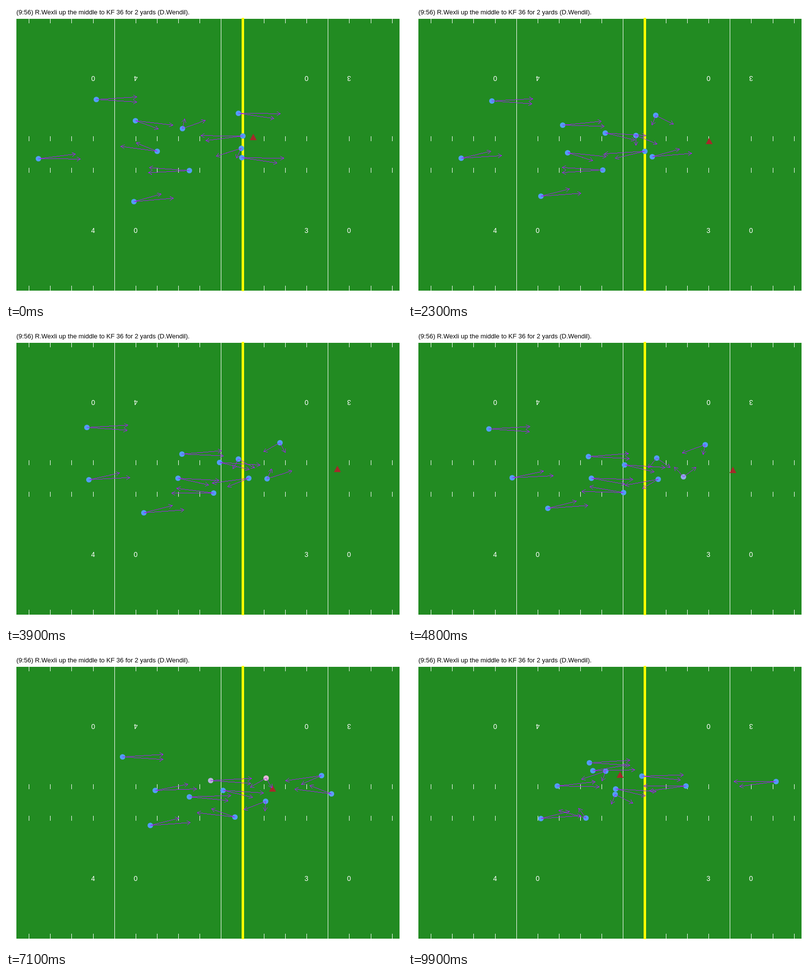
These frames come from a looping animation (800x600 px, 10000 ms). An HTML page with a canvas:

```html
<!DOCTYPE html>
<html lang="en">
<head>
<meta charset="utf-8">
<title>Run play</title>
<style>
html, body { margin: 0; width: 800px; height: 600px; overflow: hidden; background: #fff; }
canvas { display: block; }
</style>
</head>
<body>
<canvas id="stage" width="800" height="600"></canvas>
<script>
const ctx = document.getElementById('stage').getContext('2d');
const YARD = 43.15, LOOP = 10000, STEP = 100, END = LOOP - STEP;
const PHASES = [0, 3900, 5800, 8400, END], HALVES = [0, 5800, END], TURN = 2300;
const REACH_X = 85, REACH_Y = 20, SPREAD = 15;

// x at PHASES, y at HALVES, heading in degrees (at the snap, after the turn, at the end),
// and for would-be tacklers the time and strength of the pink glow.
const player = (x, y, heading, peak = 0, glow = 0) => ({ x, y, heading, peak, glow });
const players = [
  player([182, 163, 174, 308, 366], [189, 203, 220], [0, 2, 0]),
  player([261, 355, 375, 451, 472], [232, 258, 247], [42, -8, 8], 7750, .7),
  player([356, 431, 440, 431, 419], [248, 276, 273], [-72, 30, 30]),
  player([305, 347, 388, 335, 301], [294, 297, 267], [-135, 38, -10]),
  player([65, 167, 258, 336, 373], [309, 291, 236], [-13, -30, -20]),
  player([370, 419, 449, 445, 359], [333, 329, 332], [-178, -180, -115]),
  player([258, 278, 286, 288, 268], [396, 354, 333], [-35, -32, -32]),
  player([469, 553, 644, 602, 561], [217, 238, 267], [17, 80, 165]),
  player([478, 469, 535, 481, 399], [263, 256, 237], [167, 75, 110], 7750, 1),
  player([475, 490, 520, 500, 418], [288, 302, 284], [112, 150, 80]),
  player([476, 527, 594, 714, 743], [307, 292, 258], [18, -35, -195], 5800, 1)
];
const ball = { x: [499, 669, 622, 457, 428], y: [266, 282, 245] };

const mix = (a, b, u) => a + (b - a) * u;

// Smooth curve through key values, starting from rest.
function smooth(v, times, t) {
  const last = v.length - 1;
  let i = 0;
  while (i < last - 1 && t >= times[i + 1]) i++;
  const span = k => times[k + 1] - times[k];
  const rate = k => (v[k + 1] - v[k]) / span(k);
  const slope = k => {
    if (k === 0) return 0;
    if (k === last) return rate(k - 1);
    return mix(rate(k - 1), rate(k), span(k - 1) / (span(k - 1) + span(k)));
  };
  const h = span(i), u = (t - times[i]) / h, w = 1 - u;
  return mix(v[i], v[i + 1], u * u * (3 - 2 * u)) + h * u * w * (slope(i) * w - slope(i + 1) * u);
}

function place(p, t) {
  return [Math.round(smooth(p.x, PHASES, t)), Math.round(smooth(p.y, HALVES, t))];
}

function facing([snap, turned, end], t) {
  return t < TURN ? mix(snap, turned, t / TURN) : mix(turned, end, (t - TURN) / (END - TURN));
}

function box(color, x, y, w, h) {
  ctx.fillStyle = color;
  ctx.fillRect(x, y, w, h);
}

function label(text, x, y, turn) {
  ctx.save();
  ctx.translate(x, y);
  ctx.rotate(turn);
  ctx.fillText(text, 0, 5);
  ctx.restore();
}

function drawField() {
  box('#fff', 0, 0, 800, 600);
  box('#228b22', 21, 26, 774, 551);
  for (let k = -4; k <= 13; k++) {
    const x = Math.floor(219.22 + k * YARD);
    if (k % 5 === 0) box('#fff', x, 26, 1, 551);
    else for (const y of [26, 264, 328, 567]) box('#fff', x, y, 1, y === 26 ? 9 : 10);
  }
  box('#ff0', 476, 24, 5, 554);

  ctx.font = '14px "Liberation Sans", Arial, sans-serif';
  ctx.textAlign = 'center';
  ctx.fillStyle = '#fff';
  [176, 262, 607, 693].forEach((x, i) => {
    label('0403'[i], x, 147, Math.PI);
    label('4030'[i], x, 455, 0);
  });

  ctx.font = '13px "Liberation Sans", Arial, sans-serif';
  ctx.textAlign = 'left';
  ctx.fillStyle = '#000';
  ctx.fillText('(9:56) R.Wexli up the middle to KF 36 for 2 yards (D.Wendil).', 21, 17);
}

// Hard-edged line, one pixel wide.
function line(x0, y0, x1, y1) {
  const n = Math.ceil(Math.max(Math.abs(x1 - x0), Math.abs(y1 - y0), 1));
  for (let i = 0; i <= n; i++) {
    box('#a020f0', Math.round(mix(x0, x1, i / n)), Math.round(mix(y0, y1, i / n)), 1, 1);
  }
}

function arrow(x, y, degrees) {
  const a = degrees * Math.PI / 180;
  const dx = REACH_X * Math.cos(a), dy = REACH_Y * Math.sin(a);
  const tipX = x + dx, tipY = y + dy, back = Math.atan2(-dy, -dx);
  line(x, y, tipX, tipY);
  for (const side of [-1, 1]) {
    const b = back + side * Math.PI / 6;
    line(tipX, tipY, tipX + 8 * Math.cos(b), tipY + 8 * Math.sin(b));
  }
}

function dot(x, y, pink) {
  ctx.fillStyle = `rgb(${mix(83, 255, pink)}, ${mix(157, 192, pink)}, ${mix(252, 203, pink)})`;
  ctx.beginPath();
  ctx.arc(x + .5, y + .5, 5.5, 0, 2 * Math.PI);
  ctx.fill();
}

function drawBall(x, y) {
  ctx.fillStyle = '#a52a2a';
  ctx.beginPath();
  ctx.moveTo(x + .5, y - 7);
  ctx.lineTo(x + 7.5, y + 6);
  ctx.lineTo(x - 6.5, y + 6);
  ctx.fill();
}

function draw(now) {
  const t = Math.floor(now % LOOP / STEP) * STEP;
  drawField();
  for (const p of players) dot(...place(p, t), p.glow * Math.exp(-(((t - p.peak) / 1000) ** 4)));
  drawBall(...place(ball, t));
  for (const p of players) {
    for (const side of [-SPREAD, SPREAD]) arrow(...place(p, t), facing(p.heading, t) + side);
  }
}

const start = performance.now();
function tick() {
  draw(performance.now() - start);
  requestAnimationFrame(tick);
}
tick();
</script>
</body>
</html>
```
